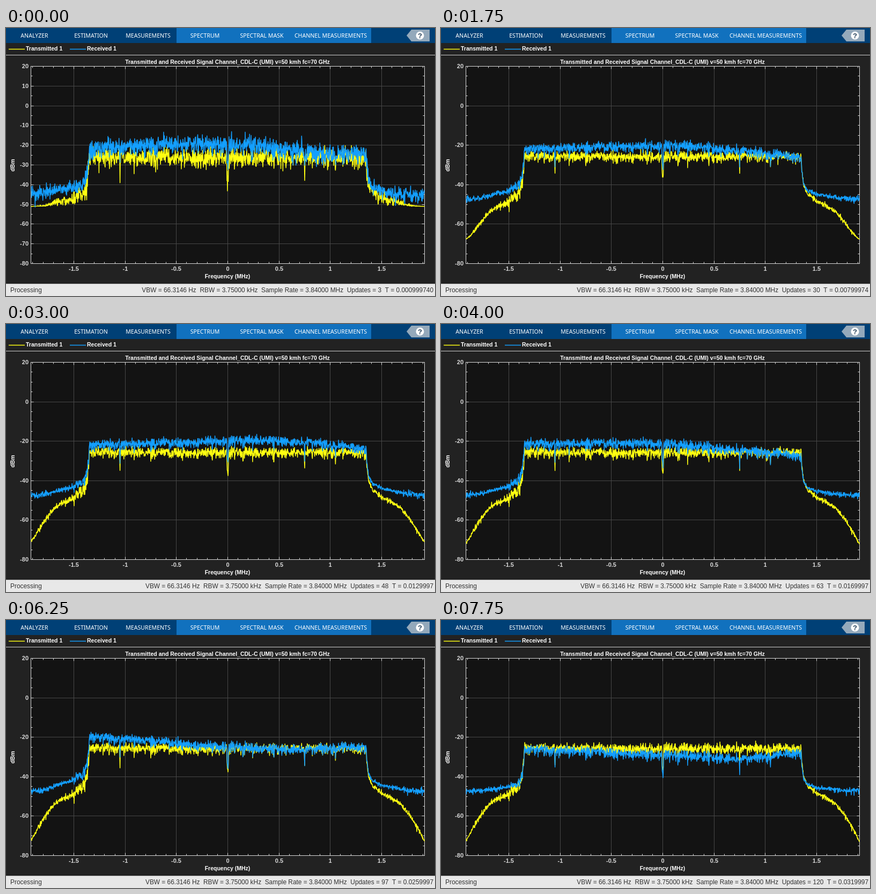
Recreate the animation shown at these times as an HTML page with a canvas. Size 800 px wide and 500 px high, loop 8 s.

```html
<!DOCTYPE html>
<html lang="en">
<head>
<meta charset="utf-8">
<title>Spectrum analyzer</title>
<style>
  html, body { margin: 0; width: 100%; height: 100%; overflow: hidden; background: #222; }
  canvas { display: block; }
</style>
</head>
<body>
<canvas id="stage" width="800" height="500"></canvas>
<script>
const ctx = document.getElementById('stage').getContext('2d');
const STEP_MS = 250, STEPS = 32, BINS = 1536, BIN_MHZ = 3.84 / BINS;
const LEFT = 46.5, RIGHT = 780.5, TOP = 71.5, BOTTOM = 439.5;
const YELLOW = '#ffff11', BLUE = '#139fff';
const SANS = '"Liberation Sans", Arial, sans-serif';
const BOLD = `bold 10.5px ${SANS}`, TICK = `bold 11px ${SANS}`, STATUS = `11.9px ${SANS}`;
const MENU = '10.6px "Noto Sans", "Open Sans", sans-serif';

const xOf = mhz => 413.5 + mhz * 191.33;
const yOf = dbm => TOP + (20 - dbm) * 3.68;

// Transmit spectrum over |frequency|: flat band, steep edge, sloping skirt
const MASK = [[0, -25.5], [1.35, -25.5], [1.356, -33], [1.375, -40.5], [1.42, -45], [1.5, -48.5],
  [1.6, -50.8], [1.7, -54.5], [1.78, -60], [1.85, -66], [1.92, -74]];

// Received band level at six frequencies from -1.35 to 1.35 MHz, keyed by step
const FADING = [
  [0, [-21.3, -19.5, -18.5, -19.5, -23.2, -24]],
  [7, [-22, -21, -20, -20.3, -23, -26]],
  [12, [-22, -21, -20, -19.2, -20.5, -23.6]],
  [16, [-21.5, -21, -20.5, -22, -24.8, -27]],
  [21, [-18.5, -19.7, -21.3, -23.5, -26, -26]],
  [25, [-19.8, -21.3, -23.7, -25.5, -26, -24.5]],
  [31, [-26.3, -27, -28.2, -29.5, -31, -27.4]]
];
const NOTCHES = [7, 4, 2.5, 4.5, 5, 5.5, 8, 4];

const mix = (a, b, t) => a + (b - a) * t;
const clamp = (v, lo, hi) => Math.min(hi, Math.max(lo, v));
const addPower = (a, b) => 10 * Math.log10(10 ** (a / 10) + 10 ** (b / 10));

function along(points, x) {
  let i = 1;
  while (i < points.length - 1 && points[i][0] < x) i++;
  const [x0, y0] = points[i - 1], [x1, y1] = points[i];
  const t = clamp((x - x0) / (x1 - x0), 0, 1);
  return Array.isArray(y0) ? y0.map((v, j) => mix(v, y1[j], t)) : mix(y0, y1, t);
}

function random(seed) {
  return () => {
    seed = seed + 0x6D2B79F5 | 0;
    let t = Math.imul(seed ^ seed >>> 15, 1 | seed);
    t = t + Math.imul(t ^ t >>> 7, 61 | t) ^ t;
    return ((t ^ t >>> 14) >>> 0) / 4294967296;
  };
}

// Ripple in dB of a power spectrum averaged over a number of looks
function ripple(seed, looks) {
  const next = random(seed * 7919 + 17);
  return Array.from({ length: BINS + 1 }, () => {
    let sum = 0;
    for (let j = 0; j < looks; j++) sum -= Math.log(next() + 1e-9);
    return 10 * Math.log10(sum / looks);
  });
}

const pattern = ripple(1, 12);

function notch(offset) {
  const centre = Math.abs(offset);
  if (centre < 4) return centre < 3 ? 8.5 : 5;
  const slot = Math.round((offset + 420) / 120);
  const away = Math.abs(offset + 420 - slot * 120);
  return away < 2 ? (NOTCHES[slot] || 0) * (away ? .45 : 1) : 0;
}

function spectra(step) {
  const looks = Math.min(5 + 8 * step, 80);
  const sentRipple = ripple(100 + step, looks);
  const gotRipple = ripple(200 + step, looks);
  const floorRipple = ripple(300 + step, Math.min(5 + 5 * step, 30));
  const leak = -51 - 28 * (1 - Math.exp(-step / 7));
  const levels = along(FADING, step);
  const sent = [], got = [];
  for (let i = 0; i <= BINS; i++) {
    const offset = i - BINS / 2, mhz = offset * BIN_MHZ, u = Math.abs(mhz);
    const inBand = u <= 1.352;
    const skirt = mhz < 0 ? clamp(1.4 - (u - 1.36) * 3, .55, 1.4) : .5;
    const amount = inBand ? 1 : Math.max(skirt, 1.2 * Math.exp(-step));
    const base = along(MASK, u) + pattern[i] * amount - (inBand ? notch(offset) : 0);
    const sentLevel = addPower(base + sentRipple[i] * amount, leak);
    const pos = clamp((mhz + 1.35) / .54, 0, 4.999), n = Math.floor(pos);
    const gain = mix(levels[n], levels[n + 1], pos - n) + 25.5;
    const floor = addPower(leak + gain, -47.2) + floorRipple[i];
    sent.push([xOf(mhz), yOf(sentLevel)]);
    got.push([xOf(mhz), yOf(addPower(base + gotRipple[i] * amount + gain, floor))]);
  }
  return { sent, got };
}

function rect(x, y, w, h, color) {
  ctx.fillStyle = color;
  ctx.fillRect(x, y, w, h);
}

function polyline(points, color, width = 1) {
  ctx.strokeStyle = color;
  ctx.lineWidth = width;
  ctx.beginPath();
  points.forEach(([x, y]) => ctx.lineTo(x, y));
  ctx.stroke();
}

function text(str, x, y, font, color, align = 'center') {
  ctx.font = font;
  ctx.fillStyle = color;
  ctx.textAlign = align;
  ctx.fillText(str, x, y);
}

function drawHeader() {
  rect(0, 0, 800, 28, '#004076');
  rect(318, 0, 363, 28, '#1171be');
  [['ANALYZER', 53], ['ESTIMATION', 158.5], ['MEASUREMENTS', 265], ['SPECTRUM', 371],
    ['SPECTRAL MASK', 477], ['CHANNEL MEASUREMENTS', 605.5]]
    .forEach(([label, x]) => text(label, x, 18, MENU, '#fff'));

  ctx.fillStyle = '#94a9bb';
  ctx.beginPath();
  [[747, 14], [756, 3], [790, 3], [790, 25], [756, 25]].forEach(([x, y]) => ctx.lineTo(x, y));
  ctx.fill();
  ctx.fillStyle = '#fff';
  ctx.beginPath();
  ctx.arc(772, 14, 7.5, 0, 7);
  ctx.fill();
  text('?', 772, 18.5, `bold 13px ${SANS}`, '#27435c');

  polyline([[5, 39.5], [35, 39.5]], YELLOW, 1.5);
  polyline([[119, 39.5], [149, 39.5]], BLUE, 1.5);
  text('Transmitted 1', 37, 42, BOLD, '#fff', 'left');
  text('Received 1', 151, 42, BOLD, '#fff', 'left');
  polyline([[0, 50.5], [800, 50.5]], '#d0d0d0');
}

function drawGrid(major) {
  const GRID = '#474747', AXIS = '#d9d9d9';
  const tickLength = big => big ? 5 : 3;
  rect(LEFT, TOP, RIGHT - LEFT, BOTTOM - TOP, '#131313');
  const ticks = [];
  for (let i = -19; i <= 19; i++) {
    const x = Math.floor(xOf(i / 10)) + .5, big = i % 5 === 0, len = tickLength(big);
    if (big) {
      polyline([[x, TOP], [x, BOTTOM]], GRID);
      text(String(i / 10), x, 453, TICK, AXIS);
    }
    ticks.push([[x, TOP], [x, TOP + len]], [[x, BOTTOM], [x, BOTTOM - len]]);
  }
  for (let db = -80; db <= 20; db += 5) {
    const y = Math.floor(yOf(db)) + .5, big = db % major === 0, len = tickLength(big);
    if (big) {
      polyline([[LEFT, y], [RIGHT, y]], GRID);
      text(String(db), 42, y + 3.5, TICK, AXIS, 'right');
    }
    ticks.push([[LEFT, y], [LEFT + len, y]], [[RIGHT, y], [RIGHT - len, y]]);
  }
  ticks.forEach(tick => polyline(tick, AXIS));
  ctx.strokeRect(LEFT, TOP, RIGHT - LEFT, BOTTOM - TOP);

  text('Transmitted and Received Signal Channel_CDL-C (UMI) v=50 kmh fc=70 GHz', 413, 66.5, BOLD, '#fff');
  text('Frequency (MHz)', 413, 467, BOLD, '#fff');
  ctx.save();
  ctx.translate(16, 256);
  ctx.rotate(-Math.PI / 2);
  text('dBm', 0, 0, BOLD, '#fff');
  ctx.restore();
}

function drawStatus(step) {
  const updates = Math.floor(3.75 * (step + 1));
  const time = ((step + 1) / 1000 - 2.6e-7).toPrecision(6);
  rect(0, 477, 800, 23, '#e8e8e8');
  polyline([[0, 477.5], [800, 477.5]], '#b8b8b8');
  text('Processing', 8, 493, STATUS, '#333', 'left');
  text('VBW = 66.3146 Hz  RBW = 3.75000 kHz  Sample Rate = 3.84000 MHz' +
    `  Updates = ${updates}  T = ${time}`, 797, 493, STATUS, '#333', 'right');
}

function draw(step) {
  rect(0, 0, 800, 500, '#222');
  drawHeader();
  drawGrid(step ? 20 : 10);
  const { sent, got } = spectra(step);
  ctx.save();
  ctx.beginPath();
  ctx.rect(LEFT, TOP, RIGHT - LEFT, BOTTOM - TOP);
  ctx.clip();
  ctx.lineJoin = 'round';
  polyline(sent, YELLOW, 1.5);
  polyline(got, BLUE, 1.5);
  ctx.restore();
  drawStatus(step);
}

let shown = -1;
function tick() {
  const step = Math.floor(performance.now() / STEP_MS) % STEPS;
  if (step !== shown) draw(shown = step);
  requestAnimationFrame(tick);
}
tick();
</script>
</body>
</html>
```
